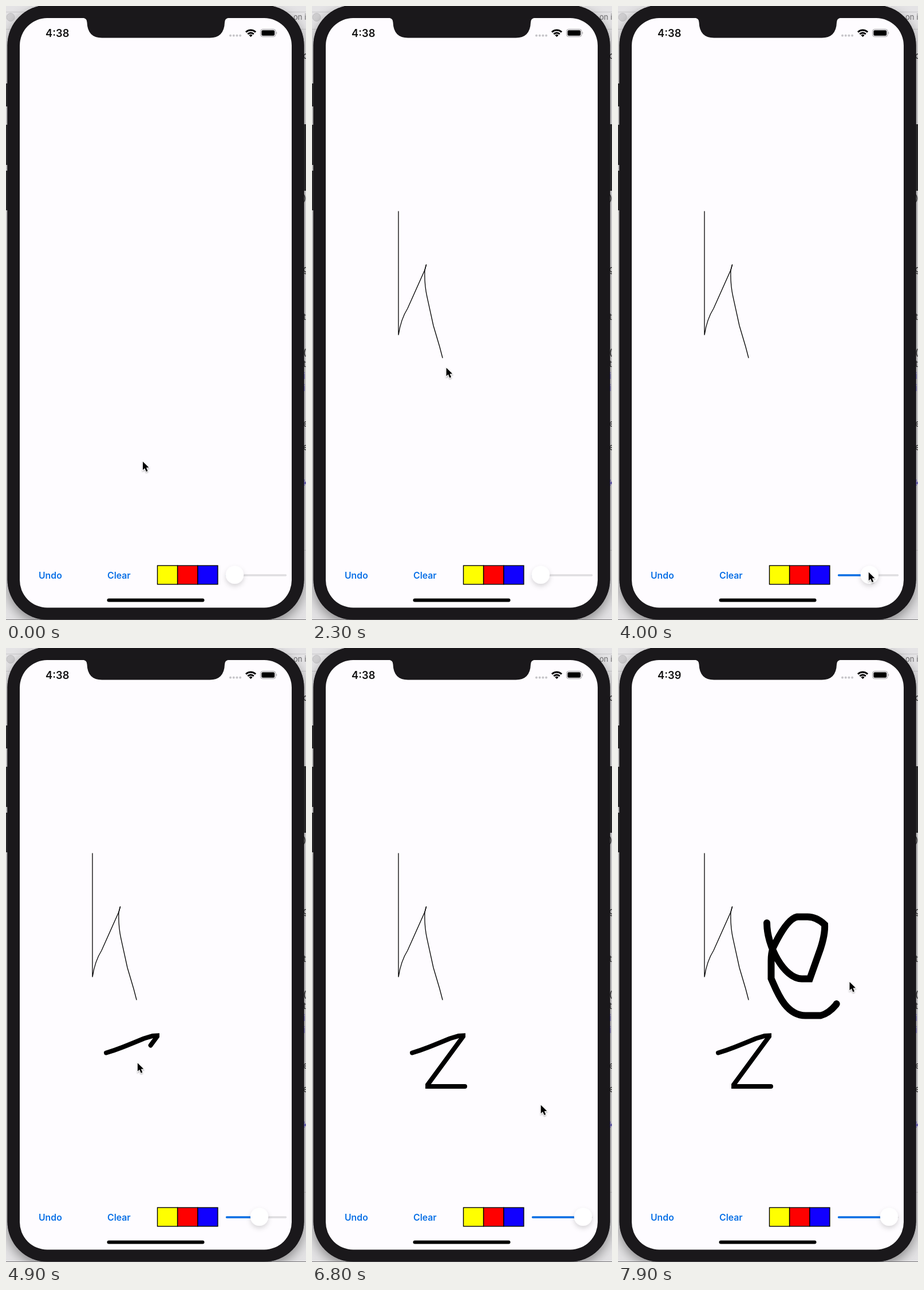
Recreate the animation shown at these times as an HTML page. Size 524 px wide and 1070 px high, loop 8 s.

```html
<!DOCTYPE html>
<html lang="en">
<head>
<meta charset="utf-8">
<title>Drawing app</title>
<style>
  html, body { margin: 0; width: 100%; height: 100%; overflow: hidden; background: #d8d7d9; }
  svg { display: block; width: 100vw; height: 100vh; }
  text { font-family: Inter, "Open Sans", sans-serif; }
  .code { font: 15px "DejaVu Sans Mono", monospace; }
  .button { font-size: 15.8px; font-weight: 600; fill: #0a70e6; }
  .track { fill: none; stroke-width: 3.4; stroke-linecap: round; }
  .ink { fill: none; stroke: #000; stroke-linecap: round; stroke-miterlimit: 2; }
</style>
</head>
<body>
<svg viewBox="0 0 524 1070" preserveAspectRatio="none">
  <defs>
    <filter id="shade" x="-10%" y="-10%" width="120%" height="120%">
      <feDropShadow dx="0" dy="8" stdDeviation="10" flood-opacity=".4"/>
    </filter>
    <filter id="soft" x="-50%" y="-50%" width="200%" height="200%">
      <feDropShadow dx="0" dy="4" stdDeviation="4" flood-opacity=".16"/>
    </filter>
    <filter id="lift" x="-50%" y="-50%" width="200%" height="200%">
      <feDropShadow dx="0" dy="1.5" stdDeviation="1.2" flood-opacity=".35"/>
    </filter>
  </defs>

  <!-- Desktop behind the phone -->
  <rect width="524" height="1070" fill="#e4e3e5"/>
  <path d="M0 10.500H524M0 40.500H524M518 948.500H524" stroke="#c9c8ca"/>
  <circle cx="8" cy="19.500" r="7" fill="#cfced0" stroke="#c2c1c3"/>

  <!-- Phone -->
  <rect x="2.500" y="-1.500" width="518" height="1071" rx="70" fill="#1a181b" filter="url(#shade)"/>
  <path d="M0 1069.500H524" stroke="#777578"/>
  <text x="502" y="24" font-size="13" fill="#69686a">on i</text>
  <text class="code" x="-6" y="92">'</text>
  <g class="code" id="editor"></g>
  <path d="M0 135h5v40H0zM0 207h5v70H0zM0 287h5v69H0zM518 206h6v116h-6z" fill="#29282a"/>
  <rect x="2.500" y="-1.500" width="518" height="1071" rx="70" fill="#1a181b"/>
  <rect x="24" y="21" width="475" height="1027.500" rx="48" fill="#fefcff"/>
  <path d="M134 20.500q7.500 1 7.500 8q1 27 26 27H356q25 0 26-27q0-7 7.500-8z" fill="#1a181b"/>

  <!-- Status bar -->
  <text id="clock" x="69" y="53.700" font-size="18.300" font-weight="600" fill="#111">4:38</text>
  <path d="M392 51.500h18" stroke="#c6c5c9" stroke-width="4" stroke-linecap="round" stroke-dasharray="0 5.700"/>
  <g fill="none" stroke="#000" stroke-width="3">
    <path d="M419 45.500a12 12 0 0 1 17 0M422.300 49a7.400 7.400 0 0 1 10.400 0"/>
    <path d="M427.500 54l-3-3a4.300 4.300 0 0 1 6 0z" fill="#000" stroke="none"/>
  </g>
  <rect x="444.500" y="40.500" width="26.500" height="13" rx="3.800" fill="none" stroke="#9b9a9d"/>
  <rect x="446.300" y="42.300" width="22.900" height="9.400" rx="2.200"/>
  <path d="M472.300 44.800q2 2.200 0 4.400z" fill="#9b9a9d"/>

  <g id="canvas"></g>

  <!-- Toolbar -->
  <text class="button" x="57" y="997.500">Undo</text>
  <text class="button" x="177" y="997.500">Clear</text>
  <g id="swatches" stroke="#000" stroke-width="1.400"></g>
  <path class="track" d="M385.500 992H488.500" stroke="#dfdee1"/>
  <path class="track" id="filled" stroke="#0a70e6"/>
  <circle id="thumb" cy="991.300" r="15.600" fill="#fff" filter="url(#soft)"/>
  <rect x="176.500" y="1032.500" width="170" height="6" rx="3"/>

  <path id="cursor" d="M0 0V14.600L3.300 11.500L5.900 17.400L8.500 16.300L6 10.600L10.500 10.200Z"
    stroke="#fff" stroke-width="1.800" paint-order="stroke" filter="url(#lift)"/>
</svg>

<script>
const LOOP = 8000, STEP = 100;
const $ = id => document.getElementById(id);

function add(parent, tag, attrs) {
  const node = document.createElementNS("http://www.w3.org/2000/svg", tag);
  for (const name in attrs) node.setAttribute(name, attrs[name]);
  return parent.appendChild(node);
}

["#ff0", "#f00", "#10f"].forEach((fill, i) =>
  add($("swatches"), "rect", { x: 264.5 + 35.2 * i, y: 975.2, width: 35, height: 32.6, fill }));

// Right margin of the code editor, one character per line
[..."c           )     g   t  (tii  e e  k"].forEach((glyph, line) => {
  const fill = /[ik]/.test(glyph) ? "#4a3fa0" : "#222";
  add($("editor"), "text", { x: 519, y: 92 + 20.67 * line, fill }).textContent = glyph;
});

// What the pointer does in turn. Ink trails the pointer by `lag`, or shows all at once at `pop`.
const moves = [
  { from: 0, to: 400, d: "M239 794L154.5 636.5" },
  { from: 500, to: 900, d: "M154.5 636.5L151 358" },
  { from: 900, to: 1450, d: "M151 358V573.5Q155 546 167 527L197 460L199.5 451", ink: 1.3, pop: 1700 },
  { from: 1600, to: 2000, d: "M199.5 451L197 460Q196 485 201 507L212 557L223 594L228 613", ink: 1.3, lag: 0 },
  { from: 2200, to: 3000, d: "M228 613C300 800 360 1060 384.5 991" },
  { from: 3000, to: 3400, d: "M384.5 991L398 985" },
  { from: 3500, to: 4100, d: "M398 985L441 987", drag: true },
  { from: 4100, to: 4400, d: "M441 987L182.5 706.5" },
  { from: 4500, to: 5200, ink: 8, lag: 100,
    d: "M175 705.5Q190 701 204 695.5T241 680.5L256 676L264 675.5V677L202 761V764H267" },
  { from: 5400, to: 5600, d: "M267 764L446 985" },
  { from: 5700, to: 5900, d: "M446 985L453 987" },
  { from: 5900, to: 6400, d: "M453 987L484 988", drag: true },
  { from: 6600, to: 7080, d: "M484 988L260 479" },
  { from: 7080, to: 7900, ink: 12, lag: 60,
    d: "M260 479C260 520 290 576 321 576.5H335L354 523Q362 498 361 482Q347 468.5 331 468.5H313"
      + "Q295 472 271 522Q267.5 532 267.5 545V576C277 597 292 641 328 640.5H354Q368 637 380.5 622L404.5 582" },
];
for (const m of moves) {
  m.path = add($("canvas"), "path", { class: "ink", d: m.d, "stroke-width": m.ink || 0 });
  m.length = m.path.getTotalLength();
}

const clamp = k => Math.min(1, Math.max(0, k));
const smooth = k => k * k * (3 - 2 * k);
const progress = (m, t) => clamp((t - m.from) / (m.to - m.from));
const pointOn = (m, t) => {
  const k = progress(m, t);
  return m.path.getPointAtLength(m.length * (m.ink ? k : smooth(k)));
};

function draw(t) {
  let knob = 399.5;
  for (const m of moves) {
    if (m.drag) knob += pointOn(m, t).x - pointOn(m, 0).x;
    const shown = m.pop ? +(t >= m.pop) : progress(m, t - m.lag);
    m.path.style.display = m.ink && shown > 0 ? "" : "none";
    m.path.setAttribute("stroke-dasharray", `${m.length * shown} ${m.length + 9}`);
  }
  const tip = pointOn(moves.findLast(m => m.from <= t), t);
  $("cursor").setAttribute("transform", `translate(${tip.x} ${tip.y})`);
  $("thumb").setAttribute("cx", knob);
  $("filled").setAttribute("d", `M385.5 992H${knob}`);
  $("clock").textContent = t < 6900 ? "4:38" : "4:39";
}

function frame() {
  draw(Math.floor(performance.now() % LOOP / STEP) * STEP);
  requestAnimationFrame(frame);
}
frame();
</script>
</body>
</html>
```
